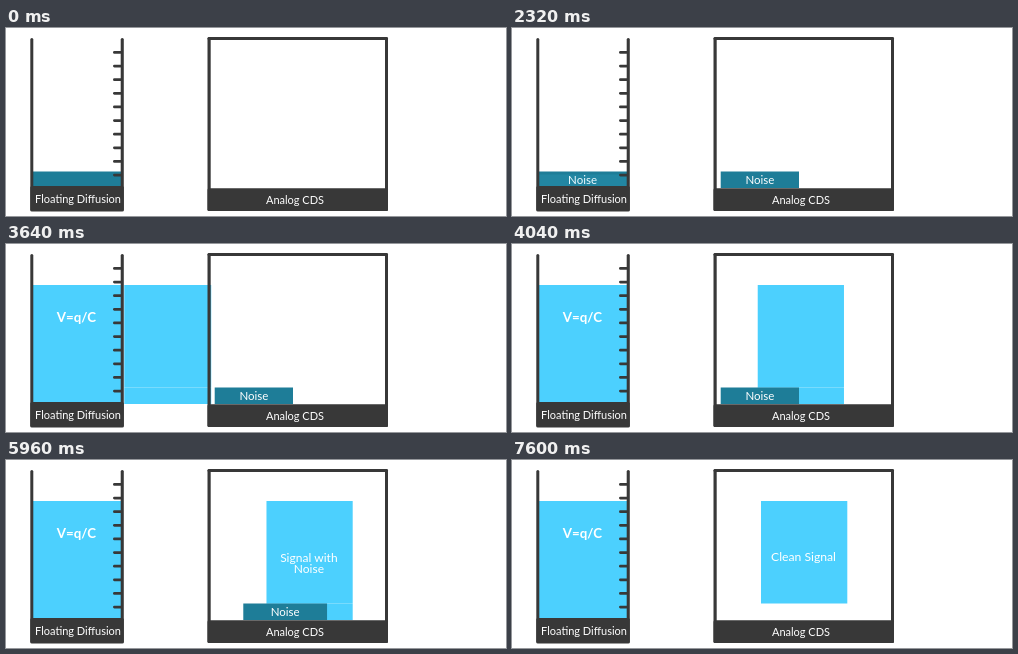
An HTML page with a canvas that plays this animation: 500 by 188 pixels, repeating every 8000 ms.

```html
<!DOCTYPE html>
<html lang="en">
<head>
<meta charset="utf-8">
<title>Correlated double sampling</title>
<style>
html, body { margin: 0; width: 100%; height: 100%; overflow: hidden; background: #fff; }
canvas { display: block; }
</style>
</head>
<body>
<canvas id="stage" width="500" height="188"></canvas>
<script>
const ctx = document.getElementById('stage').getContext('2d');
const DARK = '#383838', TEAL = '#1e7d98', BLUE = '#4cd0fe';
const LOOP = 8000;

const clamp = v => Math.max(0, Math.min(1, v));
const linear = (t, from, to) => clamp((t - from) / (to - from));
const easeOut = (t, from, to) => 1 - (1 - linear(t, from, to)) ** 2;
const mix = (a, b, p) => a + (b - a) * p;

function box(color, left, top, right, bottom, alpha = 1) {
  ctx.globalAlpha = alpha;
  ctx.fillStyle = color;
  ctx.fillRect(left, top, right - left, bottom - top);
  ctx.globalAlpha = 1;
}

function label(text, x, y, size, alpha = 1, weight = 400) {
  ctx.globalAlpha = alpha;
  ctx.fillStyle = '#fff';
  ctx.font = `${weight} ${size}px Lato, sans-serif`;
  ctx.textAlign = 'center';
  ctx.fillText(text, x, y);
  ctx.globalAlpha = 1;
}

function noiseBar(left, right, alpha = 1) {
  box(TEAL, left, 143.5, right, 160, alpha);
  label('Noise', (left + right) / 2, 156, 11.5, alpha);
}

function rounded(left, top, right, bottom) {
  ctx.fillStyle = DARK;
  ctx.beginPath();
  ctx.roundRect(left, top, right - left, bottom - top, 1.5);
  ctx.fill();
}

function drawWell() {
  rounded(24.3, 10, 27.3, 183);
  rounded(114.7, 10, 117.8, 183);
  rounded(24.3, 158, 117.8, 183.5);
  for (let i = 0; i < 10; i++) {
    const y = 24.4 + i * 13.63;
    rounded(107, y - 1.4, 116, y + 1.4);
  }
  label('Floating Diffusion', 72, 175, 11);
}

function drawSampler() {
  rounded(201.5, 9, 382, 12);
  rounded(201.5, 9, 204.7, 183);
  rounded(379, 9, 382, 183);
  rounded(201.5, 160.3, 382, 183);
  label('Analog CDS', 289, 176, 11);
}

function draw(t) {
  ctx.clearRect(0, 0, 500, 188);

  const noiseMove = easeOut(t, 1240, 2045);
  const fill = easeOut(t, 2280, 3090);
  const signalMove = easeOut(t, 3450, 4443);
  const overlap = easeOut(t, 5560, 6430);
  const noiseAlpha = 1 - linear(t, 6570, 7040);

  // Contents of the floating diffusion
  box(TEAL, 27, 143.5, 115, 159);
  label('Noise', 70.5, 156, 11.5, linear(t, 170, 1000));
  box(BLUE, 27, mix(158, 41, fill), 115, 159, fill);

  // Sampled signal
  if (signalMove > 0) {
    const left = mix(mix(27.5, 288.5, signalMove), 249, overlap);
    const right = mix(mix(115, 374.5, signalMove), 335.3, overlap);
    const middle = (left + right) / 2 - 0.7;
    const textAlpha = linear(t, 4460, 5080) * noiseAlpha;
    box(BLUE, left, 41, right, 143.5);
    box(BLUE, left, 143.5, right, 160, noiseAlpha);
    label('Signal with', middle, 102, 12, textAlpha);
    label('Noise', middle, 113, 12, textAlpha);
    label('Clean Signal', 291.5, 101, 12.2, linear(t, 7060, 7600));
  }

  // Sampled noise
  if (noiseMove > 0) {
    noiseBar(mix(mix(27, 208.7, noiseMove), 249, overlap),
      mix(mix(115, 287, noiseMove), 335, overlap), noiseAlpha);
  }

  label('V=q/C', 70.5, 77.5, 13.3, fill, 700);
  drawWell();
  drawSampler();
}

function frame() {
  draw(performance.now() % LOOP);
  requestAnimationFrame(frame);
}
frame();
</script>
</body>
</html>
```
